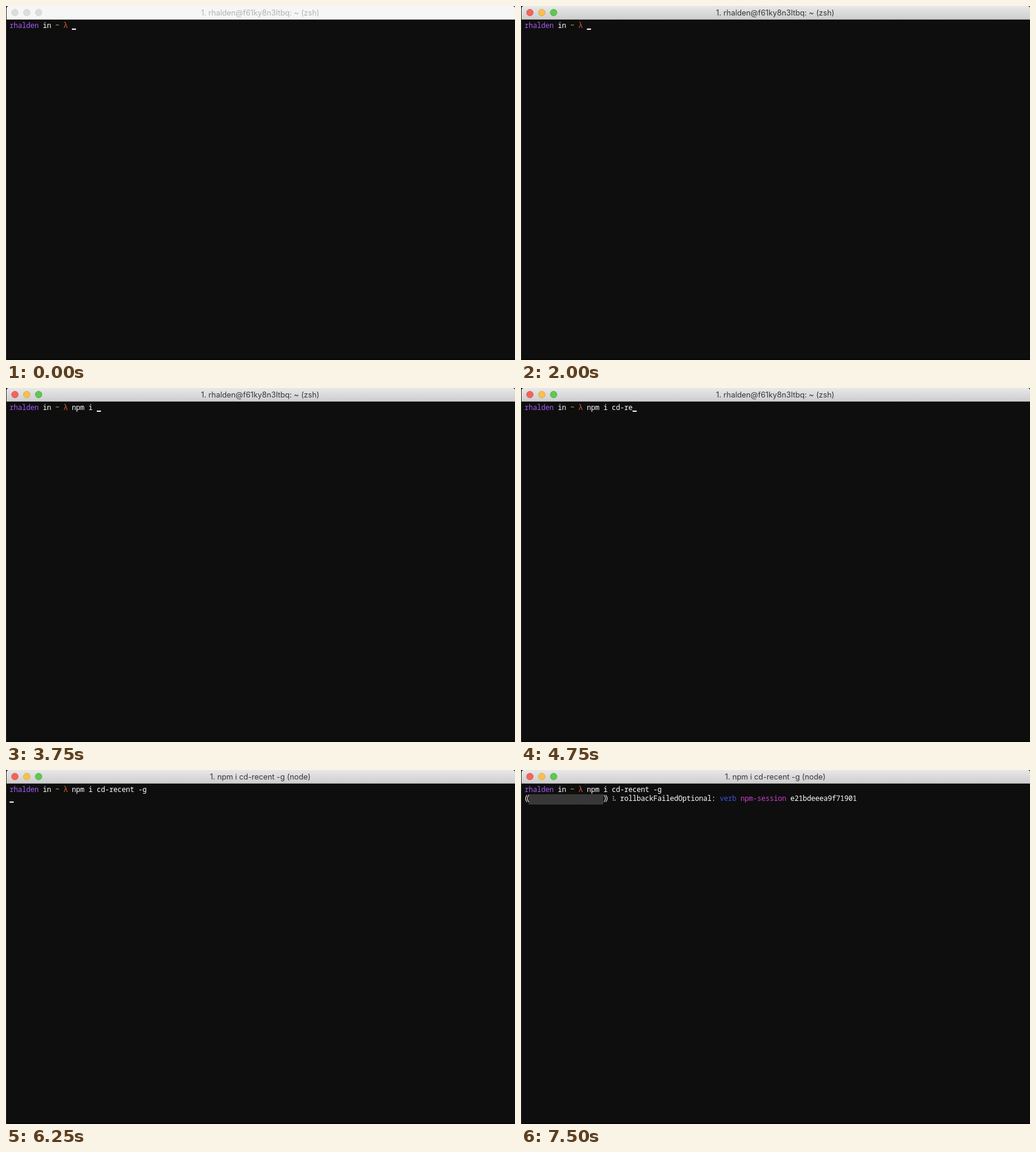
These frames come from a looping animation (858x596 px, 8000 ms). An HTML page with a canvas:

```html
<!DOCTYPE html>
<html lang="en">
<head>
<meta charset="utf-8">
<title>Terminal</title>
<style>
  html, body { margin: 0; width: 100%; height: 100%; overflow: hidden; background: #0e0e0e; }
  canvas { display: block; }
</style>
</head>
<body>
<canvas id="stage" width="858" height="596"></canvas>
<script>
const ctx = document.getElementById('stage').getContext('2d');
const LOOP = 8000, CELL = 7, LEFT = 6, LINE = 15;
const WHITE = '#fff';
const USER = 'rhalden', HOST = 'f61ky8n3ltbq';
const COMMAND = 'npm i cd-recent -g';
const PROMPT = 15;

// [time, characters typed so far]
const TYPING = [
  [2500, 2], [2750, 3], [3000, 4], [3250, 5], [3750, 6], [4000, 7], [4250, 8],
  [4500, 10], [4750, 11], [5000, 13], [5250, 15], [5500, 16], [5750, 17], [6000, 18]
];
const FOCUS = 750, ENTER = 6250, OUTPUT = 6750;

function rect(x, y, w, h, color) {
  ctx.fillStyle = color;
  ctx.fillRect(x, y, w, h);
}

const columnX = col => LEFT + col * CELL;

function write(text, col, row, color) {
  ctx.font = '500 12px "Noto Sans Mono", monospace';
  ctx.textAlign = 'center';
  ctx.fillStyle = color;
  [...text].forEach((ch, i) =>
    ctx.fillText(ch, columnX(col + i) + CELL / 2, 37 + row * LINE));
}

function cursor(col, row) {
  rect(columnX(col), 38 + row * LINE, CELL, 2, WHITE);
}

function titleBar(focused, title) {
  const shade = ctx.createLinearGradient(0, 0, 0, 22);
  shade.addColorStop(0, focused ? '#e8e8e8' : '#f6f6f6');
  shade.addColorStop(1, focused ? '#cecece' : '#f6f6f6');
  ctx.fillStyle = shade;
  ctx.beginPath();
  ctx.roundRect(1, 0, 857, 22, [4, 4, 0, 0]);
  ctx.fill();
  rect(1, 22, 857, 1, focused ? '#aaa' : '#d2d2d2');

  const lights = focused
    ? [['#f3645b', '#d9524a'], ['#f7c04f', '#dca43c'], ['#5fc753', '#4bae40']]
    : Array(3).fill(['#dcdcdc', '#d2d2d2']);
  lights.forEach(([fill, edge], i) => {
    ctx.beginPath();
    ctx.arc(15 + i * 20, 11, 5.6, 0, Math.PI * 2);
    ctx.fillStyle = fill;
    ctx.fill();
    ctx.strokeStyle = edge;
    ctx.lineWidth = 0.8;
    ctx.stroke();
  });

  ctx.font = '12.8px Inter, sans-serif';
  ctx.textAlign = 'center';
  ctx.fillStyle = focused ? '#363636' : '#b2b2b2';
  ctx.fillText(title, 428.5, 16);
}

function doubleParen(x, direction) {
  ctx.strokeStyle = WHITE;
  ctx.lineWidth = 1.1;
  for (const shift of [0, 3]) {
    const start = x + direction * shift;
    ctx.beginPath();
    ctx.moveTo(start + direction * 3, 42);
    ctx.quadraticCurveTo(start - direction * 2, 48, start + direction * 3, 54);
    ctx.stroke();
  }
}

function progressBar() {
  rect(13, 41, 126, 17, '#272727');
  for (let y = 41; y < 58; y += 2)
    for (let x = 13; x < 139; x += 2) rect(x, y, 1, 1, '#686868');
  doubleParen(7.2, 1);
  doubleParen(145.8, -1);
  for (const [x, y] of [[155, 44], [155, 47], [155, 50], [158, 50]])
    rect(x, y, 1.4, 1.4, WHITE);
}

function draw(t) {
  const focused = t >= FOCUS, entered = t >= ENTER;
  rect(0, 0, 858, 596, '#0e0e0e');
  rect(0, 4, 1, 592, '#2a2a2a');
  rect(1, 594, 857, 2, '#070707');
  titleBar(focused, entered ? `1. ${COMMAND} (node)` : `1. ${USER}@${HOST}: ~ (zsh)`);

  write(USER, 0, 0, '#a55cf5');
  write('in', 8, 0, WHITE);
  write('~', 11, 0, '#a3e03c');
  write('λ', 13, 0, '#d9642c');

  const typed = TYPING.reduce((n, [time, count]) => t >= time ? count : n, 0);
  write(COMMAND.slice(0, typed), PROMPT, 0, WHITE);

  const blinkedOff = (t >= 750 && t < 1000) || (t >= 1500 && t < 2000);
  if (!entered) {
    if (!blinkedOff) cursor(PROMPT + typed, 0);
  } else if (t < OUTPUT) {
    cursor(0, 1);
  } else {
    progressBar();
    write('rollbackFailedOptional:', 23, 1, WHITE);
    write('verb', 47, 1, '#3a56d4');
    write('npm-session', 52, 1, '#cb3fcb');
    write('e21bdeeea9f71901', 64, 1, WHITE);
  }
}

const began = performance.now();
function tick() {
  draw((performance.now() - began) % LOOP);
  requestAnimationFrame(tick);
}
tick();
</script>
</body>
</html>
```
